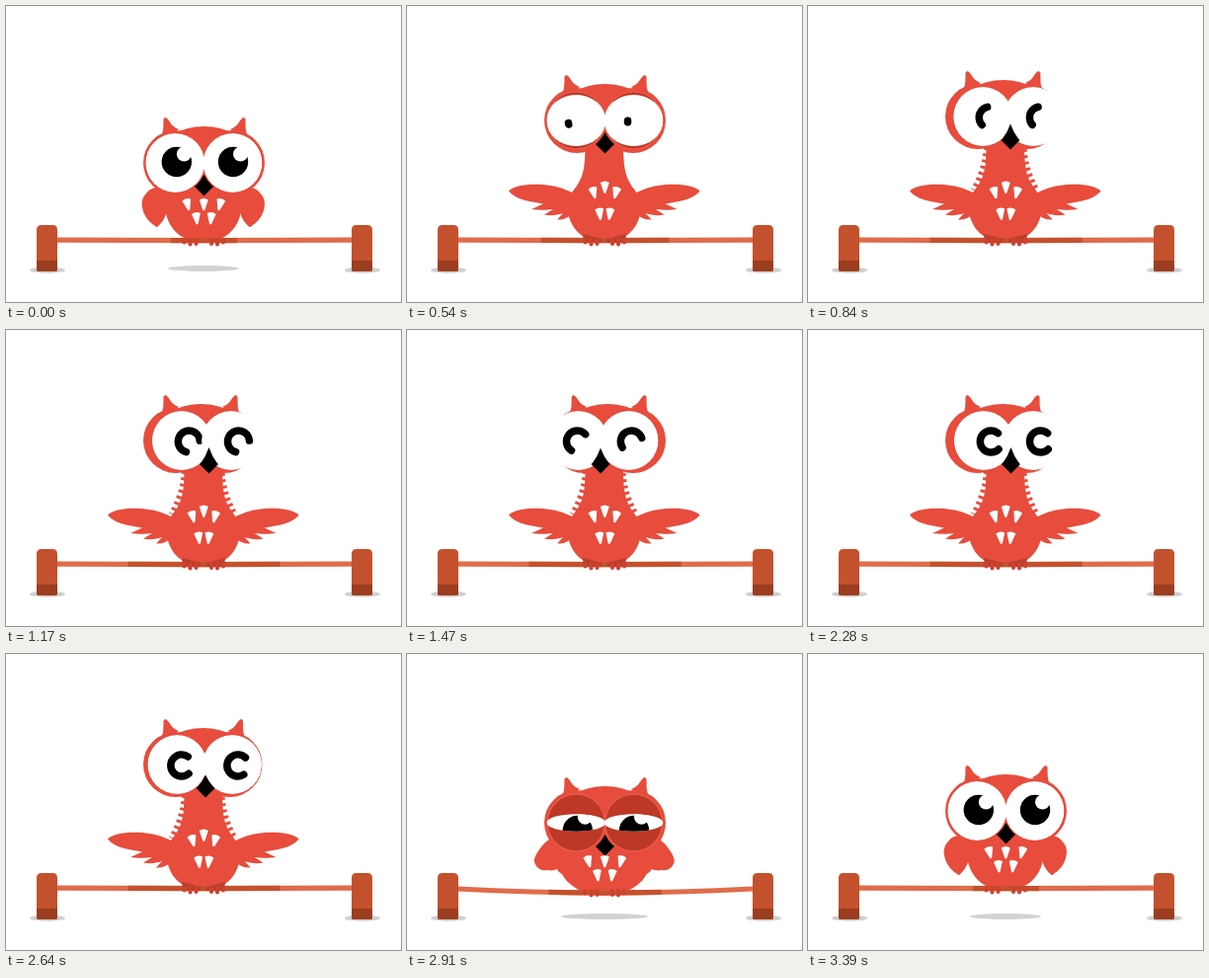
An HTML page without scripts that plays this animation: 400x300 px, repeating every 3630 ms.

```html
<!DOCTYPE html>
<html lang="en">
<head>
<meta charset="utf-8">
<title>Owl on a rod</title>
<style>
@property --lift { syntax: "<length>"; inherits: true; initial-value: 0px; }
@property --turn { syntax: "<number>"; inherits: true; initial-value: 0; }
@property --lid { syntax: "<number>"; inherits: true; initial-value: 1; }
@property --look { syntax: "<length>"; inherits: true; initial-value: 0px; }
@property --ring { syntax: "<number>"; inherits: true; initial-value: 0; }
@property --arc { syntax: "<number>"; inherits: true; initial-value: 10; }
@property --start { syntax: "<angle>"; inherits: true; initial-value: 160deg; }
@property --open { syntax: "<number>"; inherits: true; initial-value: 0; }
@property --rough { syntax: "<number>"; inherits: true; initial-value: 0; }
@property --ground { syntax: "<number>"; inherits: true; initial-value: 1; }
@property --shade { syntax: "<length>"; inherits: true; initial-value: 33.5px; }

html, body { margin: 0; width: 100%; height: 100%; overflow: hidden; background: #fff; }
svg { display: block; width: 400px; height: 300px; }
svg, .body, .wing, .rod { animation: 3630ms ease-in-out infinite; }
svg { animation-name: pose; }
.body { animation-name: body; }
.wing { animation-name: wing; }
.rod { animation-name: bend; }

@keyframes pose {
  0% { --lift: 0px; --turn: 0; --lid: 1; --look: 0px; --ring: 0; --arc: 10; --start: 160deg; --open: 0; --rough: 0; --ground: 1; --shade: 33.5px; }
  5.8% { --lift: 12px; --lid: .3; --look: 9px; --open: 0; --shade: 57px; }
  7.9% { --ring: 0; --lid: .04; }
  8% { --ring: 1; }
  8.3% { --lift: 9px; --lid: .04; --ground: 1; }
  13% { --ground: 0; }
  14.9% { --lift: -43px; --turn: 0; --lid: .87; --arc: 8; --start: 164deg; --open: 1; --shade: 65px; }
  15.5% { --rough: 0; }
  17.4% { --lift: -50px; --lid: 1; --turn: 0; --rough: 1; --shade: 77px; }
  20.7% { --lift: -47px; }
  24.8% { --turn: 1; }
  32.2% { --arc: 250; --start: 105deg; }
  36.4% { --turn: 1; --arc: 250; --start: 105deg; }
  41.3% { --turn: -1; }
  48.8% { --arc: 12; --start: 184deg; }
  52.9% { --turn: -1; --arc: 12; --start: 184deg; }
  57.9% { --turn: 1; }
  62.8% { --arc: 265; --start: 45deg; }
  70.2% { --turn: 1; --arc: 265; --start: 45deg; }
  74% { --rough: 1; }
  74.4% { --lift: -47px; --turn: 0; --lid: 1; --open: 1; --shade: 77px; }
  75% { --rough: 0; }
  76% { --ground: 0; }
  77.2% { --ring: 1; --lid: .04; }
  77.3% { --ring: 0; --look: 9px; }
  78.5% { --lift: 13px; --ground: 1; --open: 0; }
  80.2% { --lift: 12px; --lid: .29; --look: 9px; --shade: 57px; }
  84.3% { --lift: 5px; }
  90.1%, 100% { --lift: 0px; --turn: 0; --lid: 1; --look: 0px; --ring: 0; --arc: 10; --start: 160deg; --open: 0; --rough: 0; --ground: 1; --shade: 33.5px; }
}
@keyframes body {
  0%, 90.1%, 100% { d: path("M202 140L180 140C160 165 157 195 163 214C168 230 182 240 202 240Z"); }
  5.8%, 79%, 80.2% { d: path("M202 150L180 150C158 170 150 195 155 218C160 235 180 245 202 245Z"); }
  14.9%, 74.4% { d: path("M202 120L180 120C182 172 178 174 165 192C157 215 172 240 202 240Z"); }
}
@keyframes wing {
  0%, 90.1%, 100% { d: path("M165 185C155 182 146 184 142 190C138 194 137 199 138 204C139 210 141 213 144 217L145 218C146 219 147 220 148 221L149 221.5C150 222 151 223 152 224L153 224C158 220 161 215 163 208Z"); }
  5.8%, 79%, 80.2% { d: path("M165 190C152 184 144 186 139 192C133 199 128 206 129 211C131 217 136 220 141 219L142 219C146 220 149 219 152 218L153 220C155 222 157 223 159 224L160 224C162 222 164 218 165 214Z"); }
  14.9%, 74.4% { d: path("M175 193C165 188 155 183 145 182C130 179 108 181 103 187.5C110 196 122 198 138 200.5L126 206C134 207 140 207 148 206L139 211.5C146 213 152 212 158 210L152 216.5C158 217 163 215 168 210Z"); }
}
@keyframes bend {
  0%, 14.9%, 74.4%, 90.1%, 100% { d: path("M51 237.1Q200.5 238 350 237.1"); }
  5.8%, 79%, 80.2% { d: path("M51 238Q200.5 246 350 238"); }
}

.red { fill: #e74c3c; }
.rod { fill: none; stroke: #e06c4a; stroke-width: 5.2; }
.rod.dark { stroke: #c4512d; stroke-dasharray: 0px calc(149.5px - var(--shade)) calc(2 * var(--shade)) 300px; }
.ground { rx: calc(36px + max(0px, var(--lift)) * .67); opacity: var(--ground); }
.rough { fill: none; stroke: #e74c3c; stroke-width: 7; stroke-dasharray: 3 3.5; opacity: var(--rough); }
.feet { transform: translateY(calc(max(0px, var(--lift)) * .25)); }
.legs { opacity: var(--open); }
.marks { transform: translateY(calc(max(0px, var(--lift)) * .75)); }
.marks use { transform: translate(calc(200.3px + var(--x) * (16.5px - 5.2px * var(--open))), calc(201px - var(--up) * var(--open))) rotate(calc(var(--x) * 14deg)); }

.head { --abs: max(var(--turn), -1 * var(--turn)); transform: translateY(var(--lift)); }
.near { transform: translateX(calc(8px * max(0, -1 * var(--turn)))); }
.far { transform: translateX(calc(-8px * max(0, var(--turn)))); }
.cap { transform: translateX(calc(-3px * var(--turn))); }
.eye.l { transform: translate(calc(171.3px + 2px * var(--turn) + 4.5px * var(--abs)), 159px); }
.eye.r { transform: translate(calc(229.5px + 2px * var(--turn) - 3.5px * var(--abs)), 159px); }
.lid { fill: #bd3827; stroke: #ea6653; opacity: calc((1 - var(--lid)) * 8); }
.slit { ry: calc(30px * var(--lid)); }
.pupil { transform: translateY(var(--look)); opacity: calc(1 - var(--ring)); }
.glint { fill: #fff; transform: translateY(calc(var(--look) * -.65)); }
.ring { fill: none; stroke: #000; stroke-width: 7.5; stroke-linecap: round; opacity: var(--ring); stroke-dasharray: calc(var(--arc) * 1px) 360px; }
.l .ring { transform: translate(calc(3px + 4.5px * var(--turn)), 1px) rotate(var(--start)); }
.r .ring { transform: translate(calc(5px + 2.5px * var(--turn)), 1px) rotate(calc(var(--start) + (1 - var(--turn)) * 12deg)); }
.beak { transform: translate(calc(200.5px + 5px * var(--turn)), 183px); }
.spike { transform: scaleY(calc(.7 + .3 * var(--abs))); }
</style>
</head>
<body>
<svg viewBox="0 0 400 300">
  <defs>
    <clipPath id="slit"><ellipse class="slit" rx="30" ry="30"/></clipPath>
    <path id="mark" d="M-4.5-4.5Q0-7.5 4.5-4.5L.9 6.3H-.9Z" fill="#fff"/>
    <g id="post">
      <ellipse cx="42" cy="267.7" rx="18" ry="3" fill="#cfcfcf"/>
      <path d="M31 269V227Q31 222 36 222H47Q52 222 52 227V267Q52 269 50 269H33Q31 269 31 267Z" fill="#c4512d"/>
      <path d="M31 258H52V267Q52 269 50 269H33Q31 269 31 267Z" fill="#9c3d20"/>
    </g>
    <path id="ear" class="red" d="M159.5 114.5Q161.5 111.5 163.5 114.5C167 118 167 122 175 125L153 137C161 130 159 121 159.5 114.5Z"/>
    <path id="foot" d="M180.5 237V239.5M186.5 237V241.5M192.5 237V241" stroke="#d0402f" stroke-width="4" stroke-linecap="round"/>
  </defs>

  <ellipse class="ground" cx="200" cy="266" rx="36" ry="3" fill="#d2d2d2"/>

  <g class="red">
    <path class="body"/>
    <path class="wing"/>
    <path class="rough" d="M181.5 143Q180 166 168 187"/>
  </g>
  <g class="red" transform="matrix(-1 0 0 1 399.6 0)">
    <path class="body"/>
    <path class="wing"/>
    <path class="rough" d="M181.5 145Q180 167 168 188"/>
  </g>

  <path class="rod"/>
  <path class="rod dark" pathLength="299"/>
  <use href="#post"/>
  <use href="#post" x="319"/>

  <g class="feet">
    <path class="legs" d="M178 231L197 236V240H179ZM222 231L203 236V240H221Z" fill="#b8402c"/>
    <use href="#foot"/>
    <use href="#foot" transform="matrix(-1 0 0 1 400.5 0)"/>
  </g>

  <g class="marks">
    <use href="#mark" style="--x:-1;--up:12px"/>
    <use href="#mark" style="--x:0;--up:17.5px"/>
    <use href="#mark" style="--x:1;--up:12px"/>
    <g transform="translate(0 14)">
      <use href="#mark" style="--x:-.45;--up:4.5px"/>
      <use href="#mark" style="--x:.45;--up:4.5px"/>
    </g>
  </g>

  <g class="head">
    <g class="red">
      <ellipse class="cap" cx="200.5" cy="150" rx="45" ry="28"/>
      <g class="near"><use href="#ear"/><circle cx="172" cy="159" r="33"/></g>
      <g class="far"><use href="#ear" transform="matrix(-1 0 0 1 402 0)"/><circle cx="229" cy="159" r="33"/></g>
    </g>
    <g class="eye l">
      <circle class="lid" r="29"/>
      <g clip-path="url(#slit)">
        <circle r="30" fill="#fff"/>
        <g class="pupil"><circle cx="1.5" cy="-1" r="15.2"/><circle class="glint" cx="9" cy="-9" r="7.5"/></g>
        <circle class="ring" r="11" pathLength="360"/>
      </g>
    </g>
    <g class="eye r">
      <circle class="lid" r="29"/>
      <g clip-path="url(#slit)">
        <circle r="30" fill="#fff"/>
        <g class="pupil"><circle cx=".5" cy="-1" r="15.2"/><circle class="glint" cx="8" cy="-9" r="7.5"/></g>
        <circle class="ring" r="11" pathLength="360"/>
      </g>
    </g>
    <g class="beak">
      <path class="spike" d="M0-17Q3-8 9 0H-9Q-3-8 0-17Z"/>
      <path d="M0-7L9.5 0L0 9.5L-9.5 0Z"/>
    </g>
  </g>
</svg>
</body>
</html>
```
